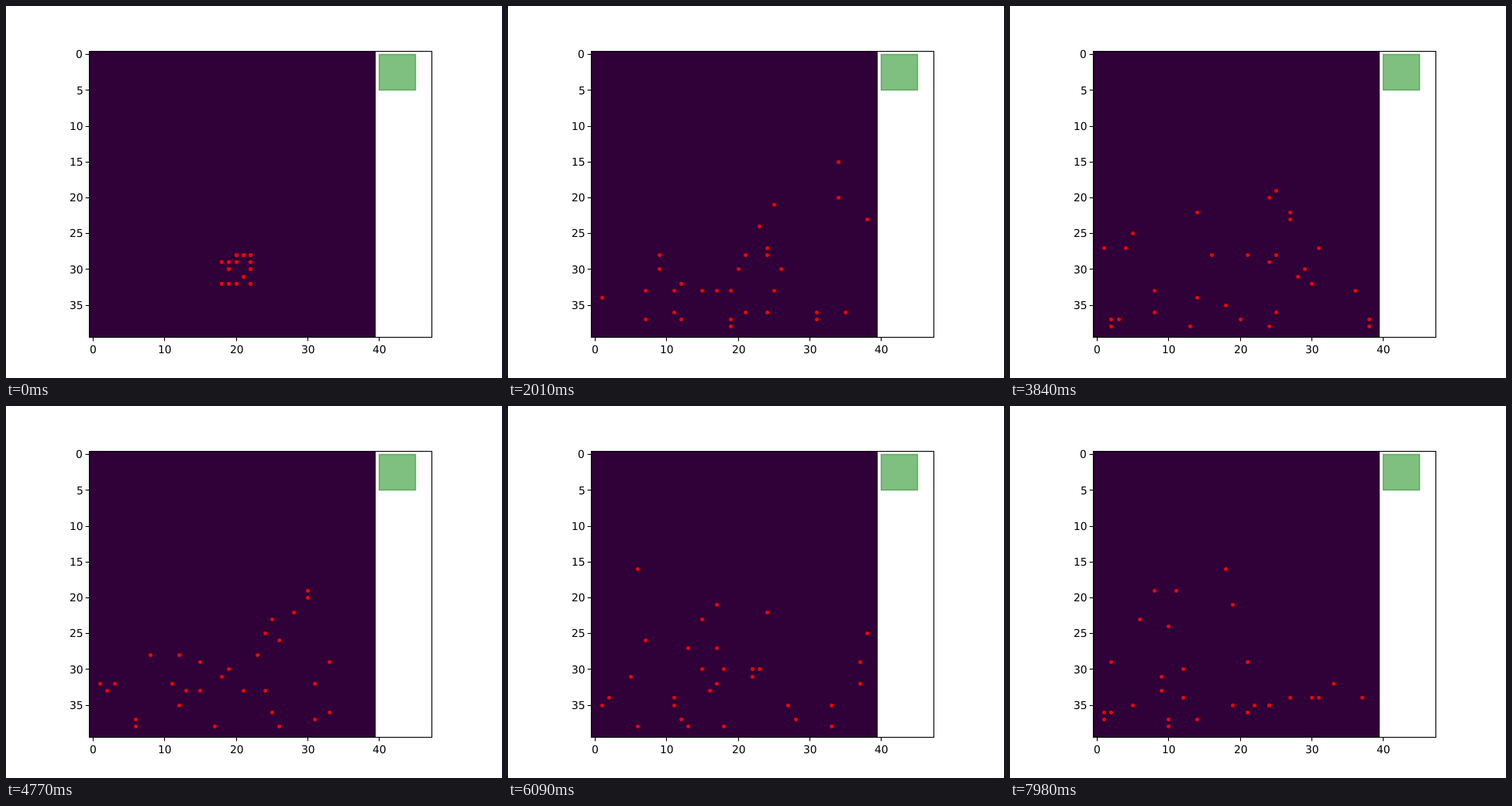
These frames come from a looping animation (640 by 480 pixels, 8000 ms). An HTML page with a canvas:

```html
<!DOCTYPE html>
<html lang="en">
<head>
<meta charset="utf-8">
<title>Random walkers</title>
<style>
  html, body { margin: 0; width: 100%; height: 100%; overflow: hidden; background: #fff; }
  canvas { display: block; }
</style>
</head>
<body>
<canvas id="stage" width="640" height="480"></canvas>
<script>
const ctx = document.getElementById('stage').getContext('2d');

const LOOP = 8000, STEP = 30, LAST_STEP = 266;
const COUNT = 30, LOW = 1, HIGH = 38;
const UNIT = 9.24, ORIGIN_X = 111.89, ORIGIN_Y = 62.22;

// Occupied columns in each row of the starting block, from row 28 down.
const START_ROWS = [[20, 21, 22], [18, 19, 20, 22], [19, 22], [21], [18, 19, 20, 22]];
const starts = START_ROWS.flatMap((columns, row) => columns.map(x => ({ x, y: 28 + row })));

let seed = 7;
function random() {
  seed = (seed * 1664525 + 1013904223) % 4294967296;
  return seed / 4294967296;
}

// Each step moves one cell up or down the axis and stops at the walls.
function move(value, forwardChance) {
  const next = value + (random() < forwardChance ? 1 : -1);
  return Math.min(HIGH, Math.max(LOW, next));
}

// Walkers sink slightly, so they gather in the lower part of the field.
const history = [Array.from({ length: COUNT }, (_, i) => starts[i % starts.length])];
while (history.length <= LAST_STEP) {
  history.push(history.at(-1).map(({ x, y }) => ({ x: move(x, 0.5), y: move(y, 0.53) })));
}

const snap = v => Math.round(v) + 0.5;
const toX = x => ORIGIN_X + x * UNIT;
const toY = y => ORIGIN_Y + y * UNIT;

function line(x1, y1, x2, y2) {
  ctx.beginPath();
  ctx.moveTo(x1, y1);
  ctx.lineTo(x2, y2);
  ctx.stroke();
}

// Aligns by ink width (0.5 centres, 1 right-aligns) and starts the ink on a whole pixel.
function label(text, x, baseline, align) {
  const box = ctx.measureText(text);
  const bearing = -box.actualBoundingBoxLeft;
  const inkWidth = box.actualBoundingBoxRight - bearing;
  const inkLeft = Math.round(x - inkWidth * align + bearing);
  ctx.fillText(text, inkLeft - bearing, baseline);
}

function drawAxes() {
  ctx.strokeStyle = ctx.fillStyle = '#000';
  ctx.lineWidth = 1.11;
  ctx.strokeRect(107.5, 58.5, 442, 369);
  ctx.font = '13.89px "DejaVu Sans", sans-serif';
  ctx.textRendering = 'geometricPrecision';
  for (let x = 0; x <= 40; x += 10) {
    line(snap(toX(x)), 427.5, snap(toX(x)), 432.4);
    label(x, toX(x), 448, 0.5);
  }
  for (let y = 0; y <= 35; y += 5) {
    line(102.6, snap(toY(y)), 107.5, snap(toY(y)));
    label(y, 97.55, Math.round(toY(y) + 5.2), 1);
  }
}

function drawPatch() {
  const left = snap(toX(40)), top = snap(toY(0));
  const box = [left, top, snap(toX(45)) - left, snap(toY(5)) - top];
  ctx.fillStyle = ctx.strokeStyle = 'rgba(0, 128, 0, 0.5)';
  ctx.lineWidth = 1.39;
  ctx.fillRect(...box);
  ctx.strokeRect(...box);
}

function draw(walkers) {
  ctx.fillStyle = '#fff';
  ctx.fillRect(0, 0, 640, 480);
  ctx.fillStyle = '#300038';
  ctx.fillRect(107, 58, 370, 369);
  drawPatch();
  ctx.fillStyle = '#f00';
  for (const { x, y } of walkers) {
    ctx.beginPath();
    ctx.arc(snap(toX(x)), snap(toY(y)), 2.43, 0, 2 * Math.PI);
    ctx.fill();
  }
  drawAxes();
}

const began = performance.now();
function tick() {
  const time = (performance.now() - began) % LOOP;
  draw(history[Math.min(LAST_STEP, Math.floor(time / STEP))]);
  requestAnimationFrame(tick);
}
tick();
</script>
</body>
</html>
```
